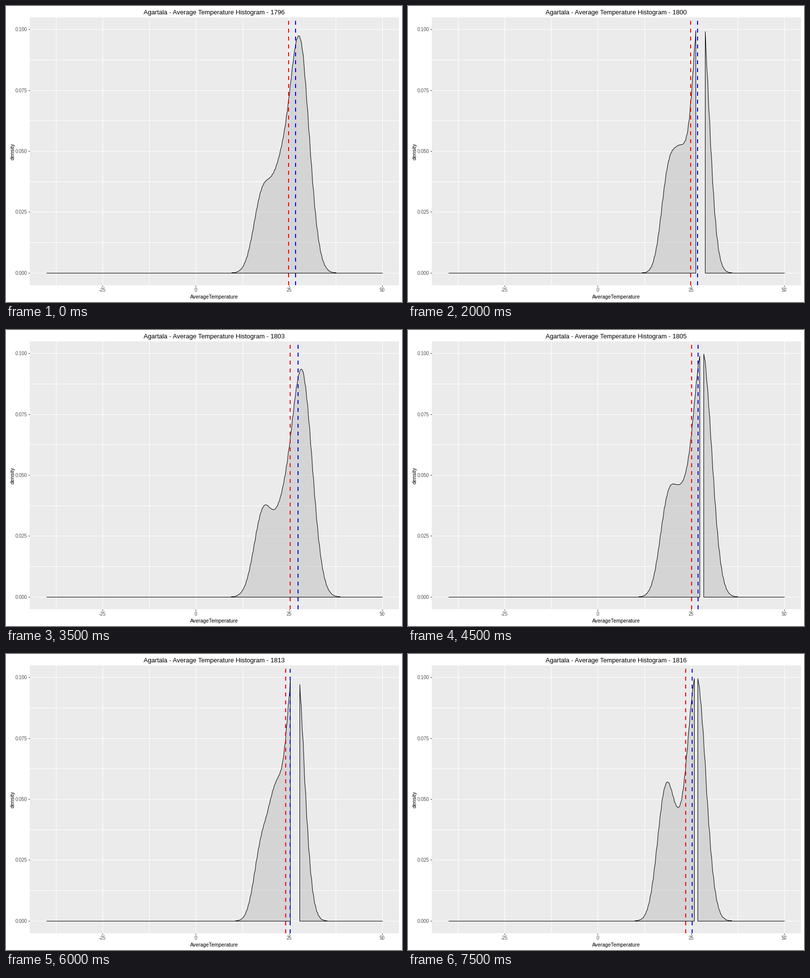
Recreate the animation shown at these times as a matplotlib script. Size 800 by 600 pixels, loop 8000 ms.

```python
import numpy as np
import matplotlib.pyplot as plt
from matplotlib.animation import FuncAnimation
from matplotlib.patches import PathPatch
from matplotlib.path import Path

W, H, DPI = 800, 600, 100
PX = 72 / DPI
plt.rcParams.update({
    "font.family": "Liberation Sans",
    "axes.unicode_minus": False,
})

FRAMES = 16
Y_MAX = 0.1

# Key points of the climate; the years between are interpolated.
KNOTS = [0, 2, 4, 7, 10, 13, 15]
COOL = [17.8, 18.9, 18.8, 18.0, 19.2, 16.7, 18.0]
WARM = [27.75, 27.7, 27.55, 28.45, 27.8, 26.1, 26.4]
BANDWIDTH = [2.35, 2.48, 1.95, 2.45, 2.12, 1.95, 2.22]
COOL_SHARE = [0.49, 0.6, 0.49, 0.56, 0.56, 0.3, 0.72]
MEDIAN = [26.77, 25.97, 26.77, 27.43, 26.63, 24.65, 25.31]

xs = np.linspace(-40, 50, 512)


def at(i, values):
    return np.interp(i, KNOTS, values)


def year(i):
    return 1796 + i + (5 if i >= 12 else 0)


def bell(centre, weight, width):
    return weight / width * np.exp(-0.5 * ((xs - centre) / width) ** 2)


def density(i):
    """Cool, mild and warm months as three overlapping bells."""
    warm, h, share = at(i, WARM), at(i, BANDWIDTH), at(i, COOL_SHARE)
    return (bell(at(i, COOL), 0.15 * share, h)
            + bell(warm - 5.2, 0.15 * (1 - share), h)
            + bell(warm, 0.246, 1.11 * h))


def outline(ys):
    """Closed outlines of the runs that stay inside the y scale."""
    inside = np.flatnonzero(ys <= Y_MAX)
    runs = np.split(inside, np.flatnonzero(np.diff(inside) > 1) + 1)
    loops = []
    for r in runs:
        x = np.r_[xs[r], xs[r[-1]], xs[r[0]], xs[r[0]]]
        y = np.r_[ys[r], 0, 0, ys[r[0]]]
        loops.append(Path(np.column_stack([x, y]), closed=True))
    return Path.make_compound_path(*loops)


fig = plt.figure(figsize=(W / DPI, H / DPI), dpi=DPI, facecolor="white")
ax = fig.add_axes([48 / W, 34.45 / H, 746 / W, 543 / H], facecolor="#EBEBEB")
ax.set(xlim=(-44.5, 54.5), ylim=(-0.005, 0.105))
ax.spines[:].set_visible(False)
ax.set_axisbelow(True)

ax.set_xticks(np.arange(-25, 51, 25))
ax.set_xticks(np.arange(-37.5, 50, 25), minor=True)
ax.set_yticks(np.arange(5) * 0.025)
ax.set_yticks(np.arange(4) * 0.025 + 0.0125, minor=True)
ax.yaxis.set_major_formatter("{x:.3f}")
ax.grid(which="both", color="white", lw=PX)
ax.tick_params(which="major", length=3 * PX, width=PX, color="#333333",
               labelcolor="#4D4D4D", labelsize=9.6 * PX, pad=2 * PX)
ax.tick_params(which="minor", length=0)


def label(x, y, text, size, **kw):
    return fig.text(x / W, 1 - y / H, text, size=size * PX, ha="center", **kw)


title = label(420.5, 17, "", 12.9, va="baseline")
label(420.5, 593, "AverageTemperature", 10.4, va="baseline")
label(13.5, 294.5, "density", 10.6, va="center", rotation=90)

area = PathPatch(outline(density(0)), facecolor=(190 / 255,) * 3 + (0.5,),
                 edgecolor="black", lw=PX, snap=True, zorder=3)
ax.add_patch(area)


def marker(color, z):
    return ax.axvline(0, color=color, lw=2 * PX, ls=(0, (4, 4)), zorder=z)


mean_line = marker("#FF0000", 4)
median_line = marker("#0000FF", 5)


def draw(i):
    ys = density(i)
    title.set_text(f"Agartala - Average Temperature Histogram - {year(i)}")
    area.set_path(outline(ys))
    mean_line.set_xdata([np.average(xs, weights=ys)] * 2)
    median_line.set_xdata([at(i, MEDIAN)] * 2)
    return title, area, mean_line, median_line


anim = FuncAnimation(fig, draw, frames=FRAMES, interval=500,
                     repeat=True, repeat_delay=0, blit=False)
plt.show()
```
